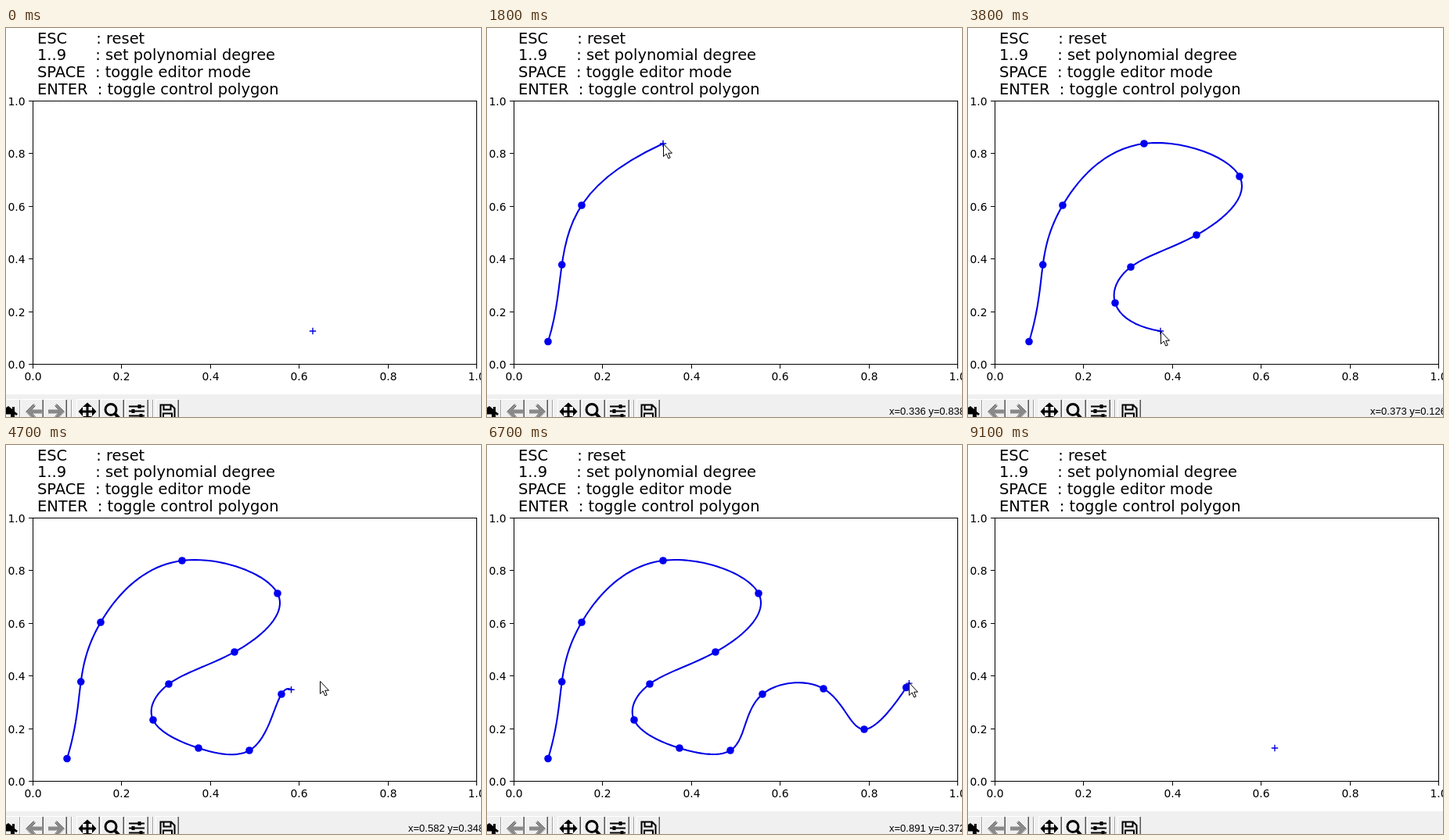
Write an HTML page that moves like this. It is 607x498 px and loops after 9500 ms.

```html
<!DOCTYPE html>
<html lang="en">
<head>
<meta charset="utf-8">
<title>Spline editor</title>
<style>
  html, body { margin: 0; width: 100%; height: 100%; overflow: hidden; background: #fff; }
  svg { display: block; }
  text { white-space: pre; }
  .help { font: 19.44px "DejaVu Sans", sans-serif; }
  .tick { font: 13.89px "DejaVu Sans", sans-serif; }
  .read { font: 13px "Liberation Sans", Arial, sans-serif; }
  .axis { fill: none; stroke: #000; shape-rendering: crispEdges; }
  .line { fill: none; stroke-width: 2.08; stroke-linejoin: round; stroke-linecap: square; }
</style>
</head>
<body>
<svg width="607" height="498" viewBox="0 0 607 498">
  <defs>
    <pattern id="stipple" width="2" height="2" patternUnits="userSpaceOnUse">
      <path d="M0 0h1v1h-1zM1 1h1v1h-1z" fill="#222"/>
    </pattern>
    <path id="back" d="M25 491l10-10 3 3-4 4.500h12v5h-12l4 4.500h-6z"/>
    <path id="arm" d="M-1.500 0V-6H-6L0 -11.500L6 -6H1.500V0z"/>
  </defs>
  <g id="help" class="help"></g>
  <g id="axes" class="tick"></g>
  <rect y="469" width="607" height="29" fill="#f0f0f0"/>
  <g id="buttons" fill="none" shape-rendering="crispEdges"></g>
  <path d="M0 486l3-2 5 4v-3h3v6l4 3-2 2-2-1.500v4H6v-4H0z"/>
  <g fill="url(#stipple)">
    <use href="#back"/>
    <use href="#back" transform="matrix(-1 0 0 1 100 0)"/>
  </g>
  <g id="pan" transform="translate(104 491)"></g>
  <g fill="none" stroke="#000" stroke-width="2">
    <circle cx="134" cy="488.500" r="7" stroke-width="3"/>
    <path d="M139 493.500l6 6.500" stroke-width="4"/>
    <path d="M157 484.500h20m-20 6h20m-20 6h20"/>
    <path d="M170.500 482v5m-8 1v5m10 1v5" stroke-width="4"/>
    <path d="M197.500 499v-16.500H211l4.500 4.500v12M201.500 482.500v6h9v-6M201 499v-5.500h11v5.500"/>
  </g>
  <text id="read" class="read" x="514" y="495"></text>
  <polyline id="curve" class="line" stroke="#0000e6"/>
  <g id="dots" fill="#0000f0"></g>
  <path id="plus" d="M-4.200 0h8.400M0-4.200v8.400" stroke="#0000d8" stroke-width="1.390"/>
  <polyline id="polygon" class="line" stroke="#e80000"/>
  <path id="arrow" d="M.5 .5v16l3.700-3.500 2.600 6 2.400-1-2.500-5.800h4.800z" fill="#fff" stroke="#000"/>
</svg>
<script>
const $ = id => document.getElementById(id);
const LOOP = 9500, ENTER = 300, POLYGON = 7500, RESET = 8900, IDLE = 9100;
const X0 = 34.5, Y0 = 430.5, W = 567, H = 337;
const START = [392, 388];
const toData = ([x, y]) => [(x - X0) / W, (Y0 - y) / H];

// time, x, y
const clicks = [
  [700, 78, 401.5], [1000, 95.7, 303.1], [1400, 121, 227], [1800, 225, 148],
  [2200, 347, 190], [2800, 292, 265], [3000, 208, 306], [3400, 188, 352],
  [3800, 246, 388], [4200, 311, 391], [4600, 352, 319], [4900, 430, 312],
  [5300, 482, 364], [6000, 535.7, 310.5]
];
const moves = [
  [400, 40, 424], [1200, 100, 274], [2600, 303, 259], [4700, 364.5, 313.2],
  [4800, 401, 302], [5800, 535.7, 311.2], [6100, 535.7, 309.5],
  [6900, 540, 304.5], [POLYGON, 535.7, 309.2], [RESET, 535.7, 309.2], [IDLE, ...START]
];
const keys = [...clicks, ...moves].sort((a, b) => a[0] - b[0]);

// redraw times: first, last, step
const times = [0];
for (const [a, b, d] of [
  [ENTER, 500, 100], [700, 800, 100], [1000, 4200, 200], [4300, 5600, 100],
  [5800, 6000, 200], [6100, 6400, 300], [6600, 7200, 100],
  [7400, POLYGON, 100], [RESET, IDLE, 100]
]) for (let t = a; t <= b; t += d) times.push(t);

// Pointer path: Catmull-Rom through the keys
function position(t) {
  if (t < keys[0][0] || t >= IDLE) return START;
  const i = keys.findIndex(k => k[0] > t) - 1;
  const at = j => keys[Math.max(0, Math.min(keys.length - 1, j))];
  const [a, b, c, d] = [at(i - 1), at(i), at(i + 1), at(i + 2)];
  const s = (t - b[0]) / (c[0] - b[0]);
  return [1, 2].map(k => b[k] + s / 2 * (c[k] - a[k] +
    s * (2 * a[k] - 5 * b[k] + 4 * c[k] - d[k] +
    s * (3 * (b[k] - c[k]) + d[k] - a[k]))));
}

// Cubic B-spline basis values at u
function basis(knots, n, u) {
  let b = knots.slice(1).map((k, i) => +(knots[i] <= u && u < k));
  if (u >= knots[n]) b = b.map((_, i) => +(i === n - 1));
  for (let d = 1; d <= 3; d++) {
    b = b.slice(1).map((next, i) => {
      const a = knots[i + d] - knots[i], c = knots[i + d + 1] - knots[i + 1];
      return (a ? (u - knots[i]) / a * b[i] : 0) +
             (c ? (knots[i + d + 1] - u) / c * next : 0);
    });
  }
  return b;
}

function solve(rows) {
  const n = rows.length;
  for (let i = 0; i < n; i++) {
    let p = i;
    for (let r = i; r < n; r++) if (Math.abs(rows[r][i]) > Math.abs(rows[p][i])) p = r;
    [rows[i], rows[p]] = [rows[p], rows[i]];
    const pivot = rows[i];
    for (let r = 0; r < n; r++) {
      if (r === i) continue;
      const f = rows[r][i] / pivot[i];
      if (f) for (let c = i; c < n + 2; c++) rows[r][c] -= f * pivot[c];
    }
  }
  return rows.map((r, i) => [r[n] / r[i], r[n + 1] / r[i]]);
}

// Centripetal, not-a-knot cubic through all points
function fit(points) {
  const n = points.length, u = [0];
  for (let i = 1; i < n; i++) {
    const [a, b] = [toData(points[i - 1]), toData(points[i])];
    u.push(u[i - 1] + Math.sqrt(Math.hypot(a[0] - b[0], a[1] - b[1])));
  }
  const end = u[n - 1];
  const knots = [0, 0, 0, 0, ...u.slice(2, n - 2), end, end, end, end];
  const ctrl = solve(points.map((p, i) => [...basis(knots, n, u[i]), ...p]));
  const count = Math.round(1.3 * n * n);
  const curve = Array.from({ length: count + 1 }, (_, i) => {
    const b = basis(knots, n, end * i / count);
    return [0, 1].map(k => ctrl.reduce((s, c, j) => s + c[k] * b[j], 0));
  });
  return { ctrl, curve };
}

const coords = list => list.map(p => p.map(v => v.toFixed(2)).join()).join(" ");
const moveTo = (id, [x, y]) => $(id).setAttribute("transform", `translate(${x} ${y})`);

function draw(i) {
  const t = times[i], pos = position(t);
  const idle = t < ENTER || t >= IDLE;
  const clicked = t >= RESET ? [] : clicks.filter(c => c[0] < t).map(c => c.slice(1));
  const points = [...clicked, pos];
  const shape = points.length > 3 ? fit(points) : { ctrl: [], curve: [] };
  $("curve").setAttribute("points", coords(shape.curve));
  $("polygon").setAttribute("points", t >= POLYGON && t < RESET ? coords(shape.ctrl) : "");
  $("dots").innerHTML = clicked.map(([x, y]) => `<circle cx="${x}" cy="${y}" r="4.8"/>`).join("");
  moveTo("plus", pos);

  // the pointer runs one step ahead of the marker, except when resting
  const rests = idle || t === POLYGON || clicks.some(c => c[0] === t);
  moveTo("arrow", (rests ? pos : position(times[i + 1])).map(Math.floor));
  $("arrow").style.display = idle ? "none" : "";
  const [dx, dy] = toData(pos);
  $("read").textContent = idle || t === ENTER ? "" : `x=${dx.toFixed(3)} y=${dy.toFixed(3)}`;
}

function buildStatic() {
  $("help").innerHTML = [
    "ESC      : reset",
    "1..9      : set polynomial degree",
    "SPACE  : toggle editor mode",
    "ENTER  : toggle control polygon"
  ].map((s, i) => `<text x="40" y="${19.5 + 21.9 * i}">${s}</text>`).join("");

  let axes = `<rect class="axis" x="${X0}" y="${Y0 - H}" width="${W}" height="${H}"/>`;
  for (let i = 0; i <= 5; i++) {
    const v = (i / 5).toFixed(1);
    const x = Math.floor(X0 + W * v) + .5, y = Math.floor(Y0 - H * v) + .5;
    axes += `<path class="axis" d="M${x} 431v5M29 ${y}h5"/>
      <text x="${x}" y="451" text-anchor="middle">${v}</text>
      <text x="24.5" y="${y + 5}" text-anchor="end">${v}</text>`;
  }
  $("axes").innerHTML = axes;

  const bar = (x, color) => `<path d="M${x + .5} 476v22" stroke="${color}"/>`;
  $("buttons").innerHTML =
    [18, 47, 77, 119, 150, 181, 220].map(x =>
      `<path d="M${x - 28.5} 498v-22.5h28.5" stroke="#fff"/>` +
      bar(x, "#555") + bar(x - 1, "#a0a0a0")).join("") +
    [83, 187].map(x => bar(x, "#a0a0a0") + bar(x + 1, "#fff")).join("");
  $("pan").innerHTML = [0, 90, 180, 270].map(a =>
    `<use href="#arm" transform="rotate(${a})"/>`).join("");
}

let shown = -1;
function tick() {
  const t = performance.now() % LOOP;
  let i = times.length - 1;
  while (times[i] > t) i--;
  if (i !== shown) draw(shown = i);
  requestAnimationFrame(tick);
}

buildStatic();
tick();
</script>
</body>
</html>
```
